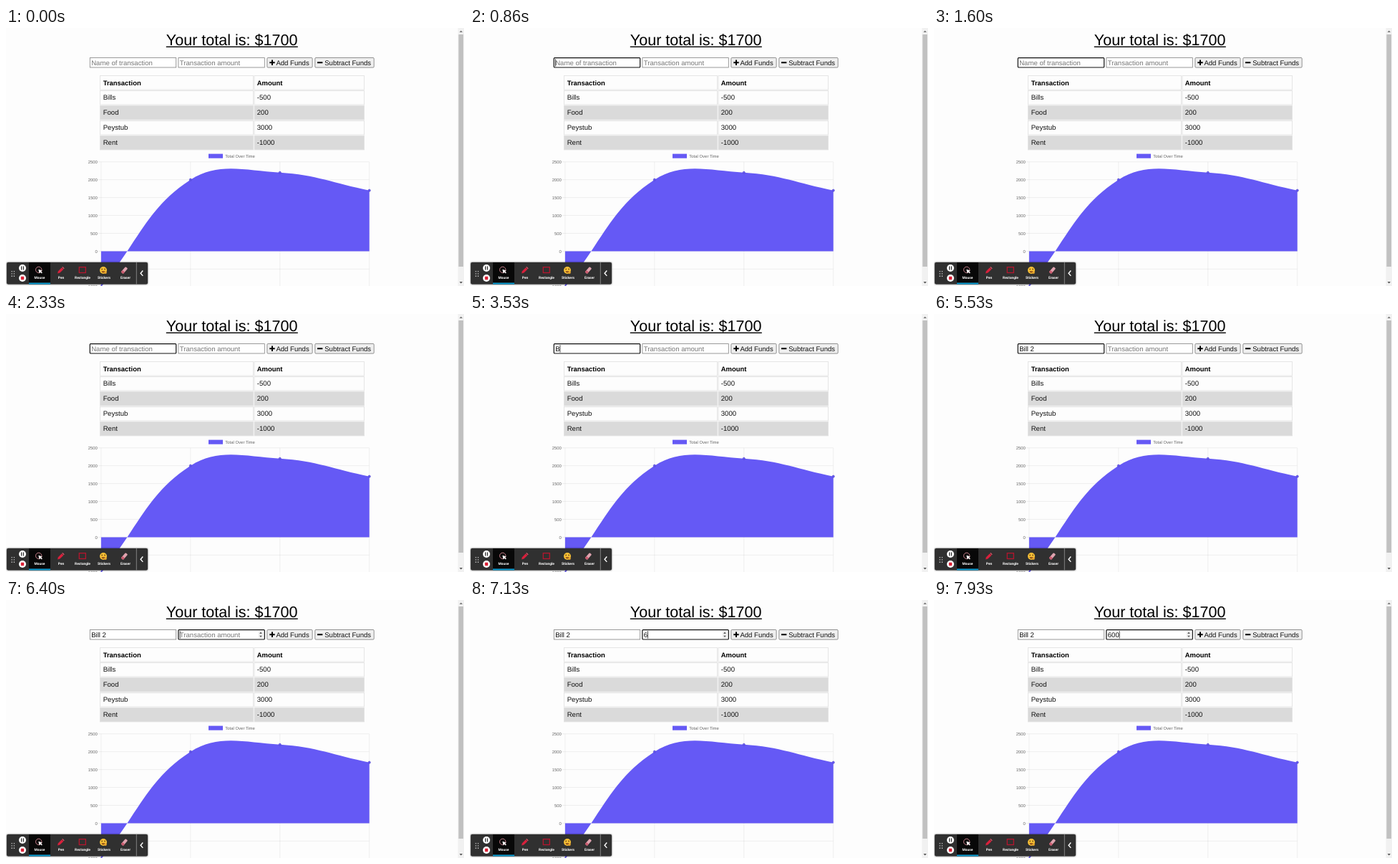
An HTML page that plays this animation: 640 px wide and 360 px high, repeating every 8 s.

```html
<!DOCTYPE html>
<html lang="en">
<head>
<meta charset="utf-8">
<title>Budget tracker</title>
<style>
  html, body { margin: 0; width: 100%; height: 100%; overflow: hidden; background: #fdfdfd; }
  svg { display: block; width: 640px; height: 360px; }
  text {
    font: 9.58px "Liberation Sans", Arial, sans-serif; fill: #111;
    white-space: pre; text-rendering: geometricPrecision;
  }
  .title { font-size: 21.55px; fill: #000; }
  .head { font-size: 9.45px; font-weight: bold; fill: #000; }
  .axis text { font-size: 5.95px; fill: #666; text-anchor: end; }
  .axis text.legend { text-anchor: start; }
  .grid { stroke: #000; stroke-opacity: .1; stroke-width: .6; }
  .button { fill: #efefef; stroke: #777; stroke-width: .8; }
  .panel { filter: drop-shadow(0 .4px 1.2px rgba(0, 0, 0, .7)); }
  .tools text { font: 700 4.85px Roboto, "Liberation Sans", sans-serif; fill: #fff; text-anchor: middle; }
</style>
</head>
<body>
<svg viewBox="0 0 640 360">
  <rect width="640" height="360" fill="#fdfdfd"/>

  <text class="title" x="223.8" y="24">Your total is: $1700</text>
  <rect x="223.8" y="25.6" width="184" height="1.4"/>

  <g id="fields"></g>

  <rect class="button" x="364.9" y="41.5" width="63.2" height="13.6" rx="1.2"/>
  <rect class="button" x="431.8" y="41.5" width="82.4" height="13.6" rx="1.2"/>
  <path d="M368.3 48.2h7.4M372 44.5v7.4M435 48.2h7.4" stroke="#000" stroke-width="2"/>
  <text x="377.4" y="51.6">Add Funds</text>
  <text x="445.2" y="51.6">Subtract Funds</text>

  <g id="table"></g>

  <g class="axis">
    <rect x="283" y="175.6" width="20" height="6.1" fill="#6559f5"/>
    <text class="legend" x="306.3" y="180.8">Total Over Time</text>
    <g id="grid"></g>
  </g>
  <g id="area" fill="#6559f5"></g>

  <g id="scrollbar">
    <rect x="631.5" width="8.5" height="360" fill="#f1f1f1"/>
    <rect x="632.4" y="9" width="6.6" height="324" fill="#c1c1c1"/>
    <path d="M633.6 6l2.2-2.6 2.2 2.6z" fill="#777"/>
    <path d="M633.6 354l2.2 2.6 2.2-2.6z" fill="#555"/>
  </g>

  <g class="tools">
    <rect class="panel" x="1" y="327" width="197" height="30.5" rx="2" fill="#303030"/>
    <rect x="32" y="327" width="30" height="30.5" fill="#080808"/>
    <rect x="32" y="355.5" width="30" height="2" fill="#12a5dc"/>
    <path d="M182.3 327v30.5" stroke="#999" stroke-width=".8"/>
    <path d="M8.2 339v8M11.4 339v8" stroke="#ccc" stroke-width="1.3" stroke-dasharray="1.3 2"/>

    <circle cx="23" cy="335" r="5" fill="#fff"/>
    <path d="M21.6 332.6v4.8M24.4 332.6v4.8" stroke="#333" stroke-width="1.3"/>
    <circle cx="23" cy="349" r="5" fill="#fff"/>
    <rect x="20.8" y="346.8" width="4.4" height="4.4" rx=".6" fill="#dc2338"/>

    <circle cx="45.7" cy="337.4" r="4.2" fill="none" stroke="#d98a96" stroke-width=".9"/>
    <path d="M45.4 336.8l1 5.6 1.4-1.7 2.1 1.7.9-1.1-2-1.7 2-1z" fill="#fff"/>

    <path d="M72 342.6l1-3.4 4.9-4.9 2.4 2.4-4.9 4.9z" fill="#d9203c"/>
    <path d="M78.4 333.8l.8-.8 2.4 2.4-.8.8z" fill="#ef5b70"/>

    <rect x="102.3" y="333.7" width="9" height="7.8" fill="none" stroke="#b5162e" stroke-width="1.3"/>

    <circle cx="136" cy="338" r="5" fill="#f6bf35"/>
    <path d="M133.4 336.5h1.5m2.4 0h1.5" stroke="#5d3b12" stroke-width="1.3"/>
    <path d="M133.4 339.3h5.2q-.6 2.2-2.6 2.2t-2.6-2.2z" fill="#8b4a1a"/>
    <circle cx="139" cy="341.2" r="1.7" fill="#e8a52c"/>

    <path d="M161.2 339.8l5.2-6q.8-.8 1.6 0l1.4 1.2q.8.8 0 1.6l-5.2 5.8q-.6.6-1.3 0l-1.7-1.4q-.5-.6 0-1.2z" fill="#dfa3af"/>
    <path d="M161.2 339.8l1.6-1.8 3.2 2.7-1.8 1.7q-.6.6-1.3 0l-1.7-1.4q-.5-.6 0-1.2z" fill="#c9596d"/>

    <path d="M191.3 338.5l-3.2 3.7 3.2 3.7" fill="none" stroke="#fff" stroke-width="1.4"/>
    <g id="labels"></g>
  </g>
</svg>

<script>
const LOOP = 8000, BLINK = 500;
const byId = id => document.getElementById(id);

function add(parent, tag, attributes, content = "") {
  const node = document.createElementNS("http://www.w3.org/2000/svg", tag);
  for (const key in attributes) node.setAttribute(key, attributes[key]);
  node.textContent = content;
  return parent.appendChild(node);
}

// Table
const rows = [["Transaction", "Amount"], ["Bills", "-500"], ["Food", "200"], ["Peystub", "3000"], ["Rent", "-1000"]];
rows.forEach((cells, i) => {
  const y = 66.6 + i * 20.95;
  const fill = i && i % 2 === 0 ? "#dadada" : "#fdfdfd";
  [[131.4, 214.2, 135.7], [347, 153.6, 350.8]].forEach(([x, width, textX], column) => {
    add(byId("table"), "rect", { x, y, width, height: 19.5, fill, stroke: "#e2e2e2", "stroke-width": .9 });
    add(byId("table"), "text", { x: textX, y: y + 12.9, class: i ? "" : "head" }, cells[column]);
  });
});

// Chart
const chartX = i => 132.9 + i * 124.95;
const chartY = value => 311.4 - value * .04985;
for (let value = 2500; value >= -1000; value -= 500) {
  const y = chartY(value);
  add(byId("grid"), "path", { class: "grid", d: `M128.2 ${y}H507.5` });
  add(byId("grid"), "text", { x: 127.9, y: y + 2.1 }, value);
}
for (let i = 0; i < 4; i++) add(byId("grid"), "path", { class: "grid", d: `M${chartX(i)} 186.8V360` });

const points = [-1000, 2000, 2200, 1700].map((value, i) => [chartX(i), chartY(value)]);
const distance = (a, b) => Math.hypot(a[0] - b[0], a[1] - b[1]);

// Control points before and after a point, with tension .4
function controls(i) {
  const p = points[i], prev = points[i - 1] || p, next = points[i + 1] || p;
  const before = distance(prev, p), after = distance(p, next);
  const shift = length => p.map((v, k) => v + .4 * length / (before + after) * (next[k] - prev[k]));
  return [shift(-before), shift(after)];
}

let curve = `M${chartX(0)} ${chartY(0)}L${points[0]}`;
for (let i = 1; i < points.length; i++) curve += `C${controls(i - 1)[1]} ${controls(i)[0]} ${points[i]}`;
add(byId("area"), "path", { d: `${curve}V${chartY(0)}Z` });
for (const [cx, cy] of points) add(byId("area"), "circle", { cx, cy, r: 1.6, stroke: "#5146c4", "stroke-width": .6 });

["Mouse", "Pen", "Rectangle", "Stickers", "Eraser"].forEach((name, i) =>
  add(byId("labels"), "text", { x: 47 + i * 30, y: 350.4 }, name));

// Input fields
function makeField(x, placeholder, hasSpinner) {
  const group = byId("fields");
  const box = add(group, "rect", { x, y: 41.6, width: 120.4, height: 13.4, fill: "#fff" });
  const label = add(group, "text", { x: x + 1.9, y: 51.6 });
  const caret = add(group, "rect", { y: 43.2, width: .7, height: 10.4 });
  const spinner = add(group, "g", {});
  if (hasSpinner) {
    add(spinner, "rect", { x: x + 111.8, y: 43, width: 6.6, height: 10.6, fill: "#efefef" });
    add(spinner, "path", { d: `M${x + 113.3} 46.9l1.8-2.3 1.8 2.3zm0 2.8l1.8 2.3 1.8-2.3z`, fill: "#555" });
  }
  return (value, focused, caretOn) => {
    label.textContent = value || placeholder;
    label.style.fill = value ? "#111" : "#777";
    box.setAttribute("stroke", focused ? "#101010" : "#808080");
    box.setAttribute("stroke-width", focused ? 1.2 : .8);
    box.setAttribute("rx", focused ? 1 : 0);
    caret.setAttribute("x", x + 1.9 + (value ? label.getComputedTextLength() : 0));
    caret.style.display = focused && caretOn ? "" : "none";
    spinner.style.display = focused ? "" : "none";
  };
}
const fields = [makeField(117.3, "Name of transaction"), makeField(240.9, "Transaction amount", true)];

// Time, focused field, name, amount
const steps = [
  [0, -1, "", ""],
  [700, 0, "", ""],
  [3420, 0, "B", ""],
  [3720, 0, "Bi", ""],
  [3920, 0, "Bil", ""],
  [4120, 0, "Bill", ""],
  [4420, 0, "Bill ", ""],
  [4950, 0, "Bill 2", ""],
  [6100, 1, "Bill 2", ""],
  [7000, 1, "Bill 2", "6"],
  [7300, 1, "Bill 2", "60"],
  [7530, 1, "Bill 2", "600"]
];

function render() {
  const time = performance.now() % LOOP;
  const [start, focus, ...values] = steps.findLast(step => step[0] <= time);
  const caretOn = (time - start) % (2 * BLINK) < BLINK;
  fields.forEach((draw, i) => draw(values[i], i === focus, caretOn));
  requestAnimationFrame(render);
}
render();
</script>
</body>
</html>
```
